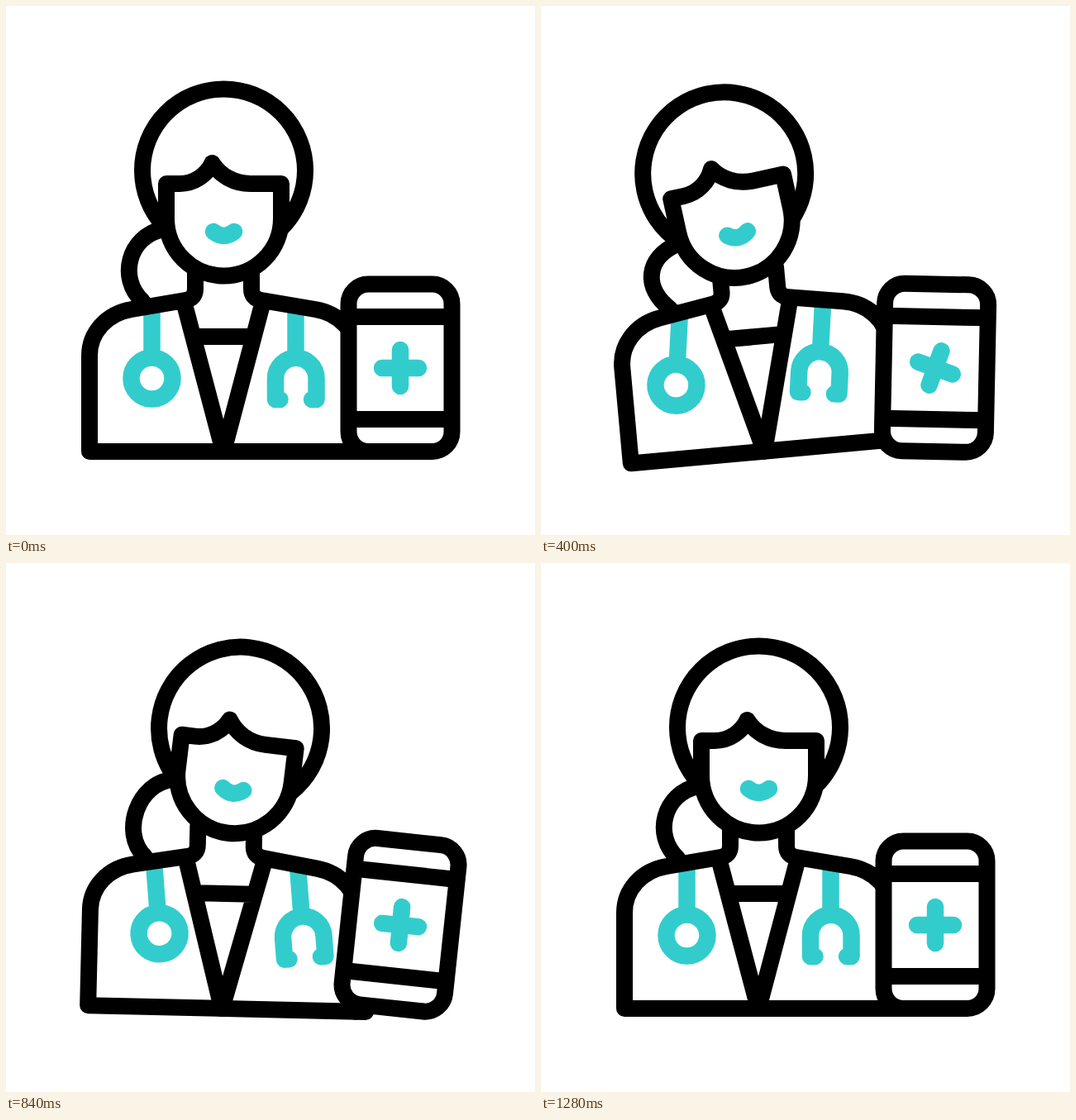
Write an HTML page that moves like this. It is 640x640 px and loops after 1.36 s.

```html
<!DOCTYPE html>
<html lang="en">
<head>
<meta charset="utf-8">
<title>Doctor with phone</title>
<style>
  html, body { margin: 0; width: 100%; height: 100%; overflow: hidden; background: #fff; }
  svg { display: block; width: 100vw; height: 100vh; }
  .ink { fill: none; stroke: #000; stroke-width: 20; stroke-linecap: round; stroke-linejoin: round; }
  .teal { fill: none; stroke: #3cc; stroke-width: 20.5; stroke-linecap: round; stroke-linejoin: round; }
  .stem { stroke-linecap: butt; }
  .solid { fill: #fff; }
</style>
</head>
<body>
<svg viewBox="0 0 640 640">
  <g id="body">
    <g id="ring" class="teal">
      <path class="stem" d="M176.5 364V426"/>
      <circle cx="176.5" cy="450.5" r="25"/>
    </g>
    <g id="fork" class="teal">
      <path class="stem" d="M350.5 364V426"/>
      <path d="M331.5 476H326V450.5A24.75 24.75 0 0 1 375.5 450.5V476H370"/>
    </g>
    <path id="tail" class="ink"/>
    <g class="ink">
      <path d="M229 318V342Q229 354 217 356L152 367C122 372 101 395 101 423V539H437"/>
      <path d="M297 318V342Q297 354 309 356L374 367C404 372 425 395 425 423V539"/>
      <path d="M216 361L263 539L310 361M229 400H297"/>
    </g>
    <g id="head">
      <circle class="ink" cx="263.5" cy="199" r="98.5"/>
      <path class="ink solid" d="M194 215H210C228 215 243 204 249.5 190C259 205 276 215 296 215H333V257A69.5 69.5 0 0 1 194 257Z"/>
      <path class="teal" d="M251 273Q263.5 283 276 273"/>
    </g>
  </g>
  <g id="phone">
    <rect class="ink solid" x="414.5" y="336.5" width="125" height="202.5" rx="24"/>
    <path class="ink" d="M415 376H539M415 500H539"/>
    <path id="plus" class="teal" d="M455 438H499M477 416V460"/>
  </g>
</svg>
<script>
  const LOOP = 1360, STEP = 40;
  const NECK = [263, 345];

  // Each track: [time in ms, degrees], eased between neighbours.
  const tracks = {
    body: [[70, 0], [400, -5.2], [700, 4], [930, 0]],
    head: [[150, 0], [460, -8], [720, 9], [1000, 0]],
    phone: [[60, 0], [280, 7.8], [560, -9], [860, 6.3], [1070, 0]],
    swing: [[190, 0], [480, 10], [780, -6.5], [1100, 1.9], [1280, 0]]
  };

  const $ = id => document.getElementById(id);
  const smooth = u => u * u * (3 - 2 * u);
  const cubic = u => u < .5 ? 4 * u ** 3 : 1 - 4 * (1 - u) ** 3;
  const clamp = u => Math.min(1, Math.max(0, u));

  function angle(name, t) {
    const keys = tracks[name];
    let a = keys[0][1];
    for (let i = 1; i < keys.length; i++) {
      const [t0, a0] = keys[i - 1], [t1, a1] = keys[i];
      if (t > t0) a = a0 + (a1 - a0) * smooth(clamp((t - t0) / (t1 - t0)));
    }
    return a;
  }

  function turn(id, deg, x, y) {
    $(id).setAttribute('transform', `rotate(${deg.toFixed(3)} ${x} ${y})`);
  }

  function spin([x, y], deg, [cx, cy]) {
    const r = deg * Math.PI / 180, c = Math.cos(r), s = Math.sin(r);
    return [cx + (x - cx) * c - (y - cy) * s, cy + (x - cx) * s + (y - cy) * c];
  }

  function draw(t) {
    const head = angle('head', t), swing = angle('swing', t);
    turn('body', angle('body', t), 263, 460);
    turn('head', head, ...NECK);
    turn('ring', swing, 176.5, 362);
    turn('fork', swing, 350.5, 362);
    turn('phone', angle('phone', t), 477, 438);
    turn('plus', 90 * cubic(clamp((t - 80) / 860)), 477, 438);

    // The ponytail's upper end follows the head, its lower end the shoulder.
    const top = spin([189.4, 270.1], head, NECK);
    const pull = spin([148.6, 278.8], head, NECK);
    $('tail').setAttribute('d', `M${top}C${pull} 134.9,328.9 165.3,357.3`);
  }

  const start = performance.now();
  function tick() {
    const t = (performance.now() - start) % LOOP;
    draw(Math.floor(t / STEP) * STEP);
    requestAnimationFrame(tick);
  }
  tick();
</script>
</body>
</html>
```
